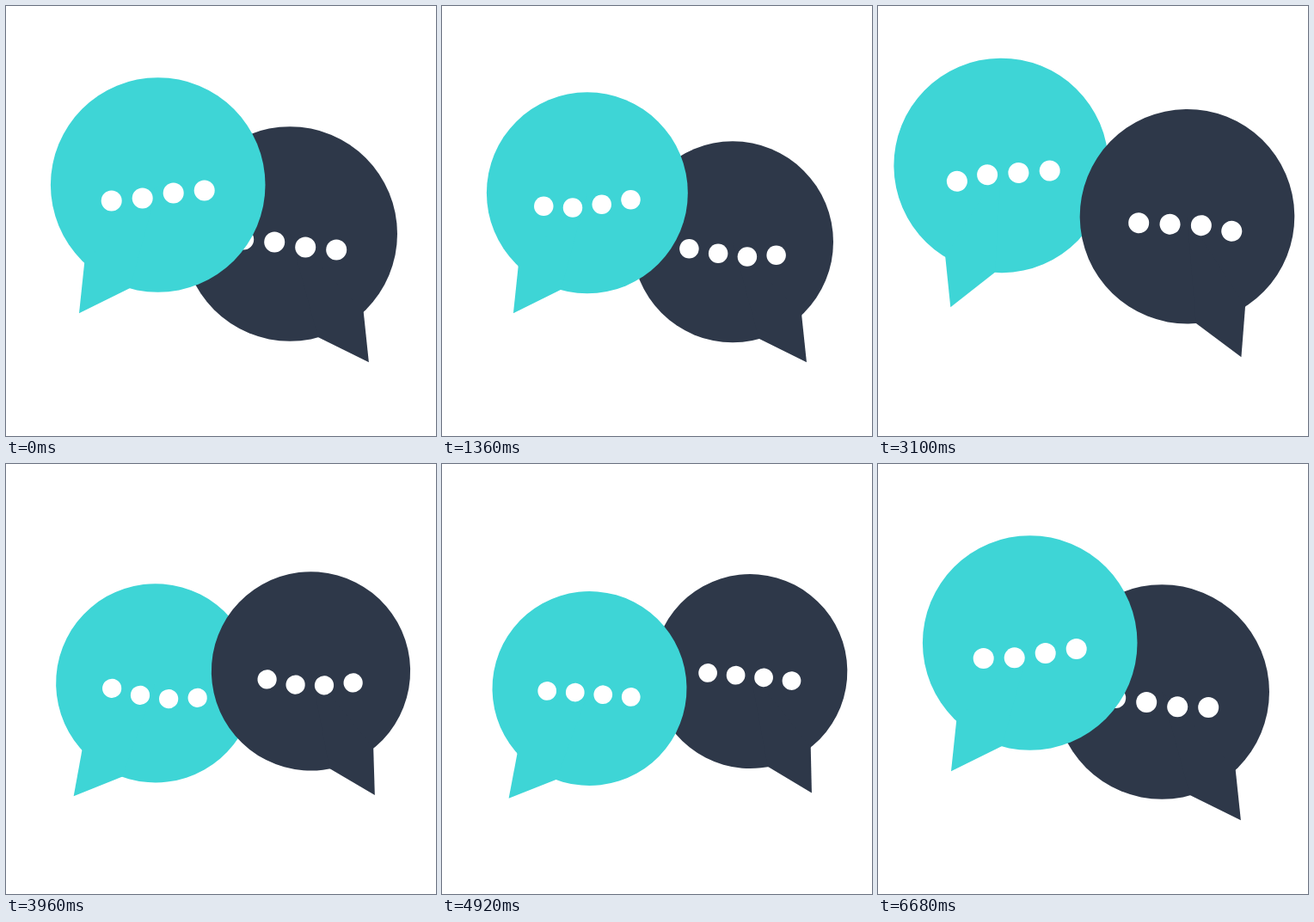
These frames come from a looping animation (500 by 500 pixels, 6.7 s). An HTML page:

```html
<!DOCTYPE html>
<html lang="en">
<head>
<meta charset="utf-8">
<title>Chat bubbles</title>
<style>
  html, body { margin: 0; width: 100%; height: 100%; overflow: hidden; background: #fff; }
  svg { display: block; width: 100%; height: 100%; }
</style>
</head>
<body>
<svg id="stage" viewBox="0 0 500 500"></svg>
<script>
const LOOP = 6700;
const NS = 'http://www.w3.org/2000/svg';
const stage = document.getElementById('stage');

function add(parent, tag, attrs) {
  const node = document.createElementNS(NS, tag);
  for (const key in attrs) node.setAttribute(key, attrs[key]);
  return parent.appendChild(node);
}

// Bubble drawn from its lower outer corner at (0, 0).
const CENTER_X = 124.8, CENTER_Y = -149;

function makeBubble(color) {
  const root = add(stage, 'g', {});
  const body = add(root, 'g', { transform: `translate(${CENTER_X} ${CENTER_Y})` });
  add(body, 'circle', { r: 124.8, fill: color });
  add(body, 'path', { d: 'M-91.7 149.2L-85.5 90.5L0 0L-32.5 120Z', fill: color });
  const dots = [0, 1, 2, 3].map(i =>
    add(body, 'circle', { cx: -54 + 36 * i, r: 12, fill: '#fff' }));
  return { root, dots };
}

const dark = makeBubble('#2e3849');
const teal = makeBubble('#3ed5d6');

function bezier(x1, y1, x2, y2) {
  const at = (u, a, b) => 3 * u * (1 - u) * (1 - u) * a + 3 * u * u * (1 - u) * b + u * u * u;
  return x => {
    let lo = 0, hi = 1;
    for (let i = 0; i < 24; i++) {
      const mid = (lo + hi) / 2;
      if (at(mid, x1, x2) < x) lo = mid; else hi = mid;
    }
    return at((lo + hi) / 2, y1, y2);
  };
}

// Rises from 0 to 1 between start and peak, then falls back to 0 at end.
function pulse(start, peak, end, rise, fall) {
  return t => {
    if (t <= start || t >= end) return 0;
    return t < peak
      ? rise((t - start) / (peak - start))
      : 1 - fall((t - peak) / (end - peak));
  };
}

const LEAN_PEAK = 2640, SWAP_PEAK = 4400;
const smooth = bezier(0.42, 0, 0.58, 1);
const shrink = pulse(0, 850, 1700, smooth, smooth);
const lean = pulse(1700, LEAN_PEAK, 3560, bezier(0.25, 0.1, 0.25, 1), bezier(0.6, 0, 0.75, 1));
const swap = pulse(3560, SWAP_PEAK, 5500, bezier(0.5, 0, 0.55, 1), bezier(0.3, 0, 0.56, 1));

// Four waves per run, each dot 200 ms after the last; a run takes 5400 ms.
function dotY(t, i) {
  const local = (t + 600) % 5400 - 200 * i;
  const active = local > 0 && local < 4800;
  return 12.5 - 6 * (active ? Math.cos(2 * Math.PI * local / 1200) : 1);
}

function place(bubble, x, y, angle, scale, side) {
  bubble.root.setAttribute('transform',
    `translate(${x} ${y}) rotate(${angle}) scale(${scale * side} ${scale})`);
}

let front = teal;
function draw(t) {
  const shift = swap(t);
  const tilt = 11.5 * Math.pow(shift, 1.14);
  const scale = 1 - 0.19 * shrink(t) - 0.194 * swap(t - 20);

  place(teal, 51.9 - 9 * shift, 357 + 63.5 * shift, tilt - 17 * lean(t), scale, 1);
  place(dark, 455 + 10.5 * shift, 414 - 63.5 * shift, tilt + 15 * lean(t), scale, -1);

  for (const bubble of [teal, dark]) {
    bubble.dots.forEach((dot, i) => dot.setAttribute('cy', dotY(t, i)));
  }

  const next = t >= LEAN_PEAK && t < SWAP_PEAK ? dark : teal;
  if (next !== front) {
    stage.appendChild(next.root);
    front = next;
  }
}

const began = performance.now();
function tick() {
  draw((performance.now() - began) % LOOP);
  requestAnimationFrame(tick);
}
draw(0);
requestAnimationFrame(tick);
</script>
</body>
</html>
```
